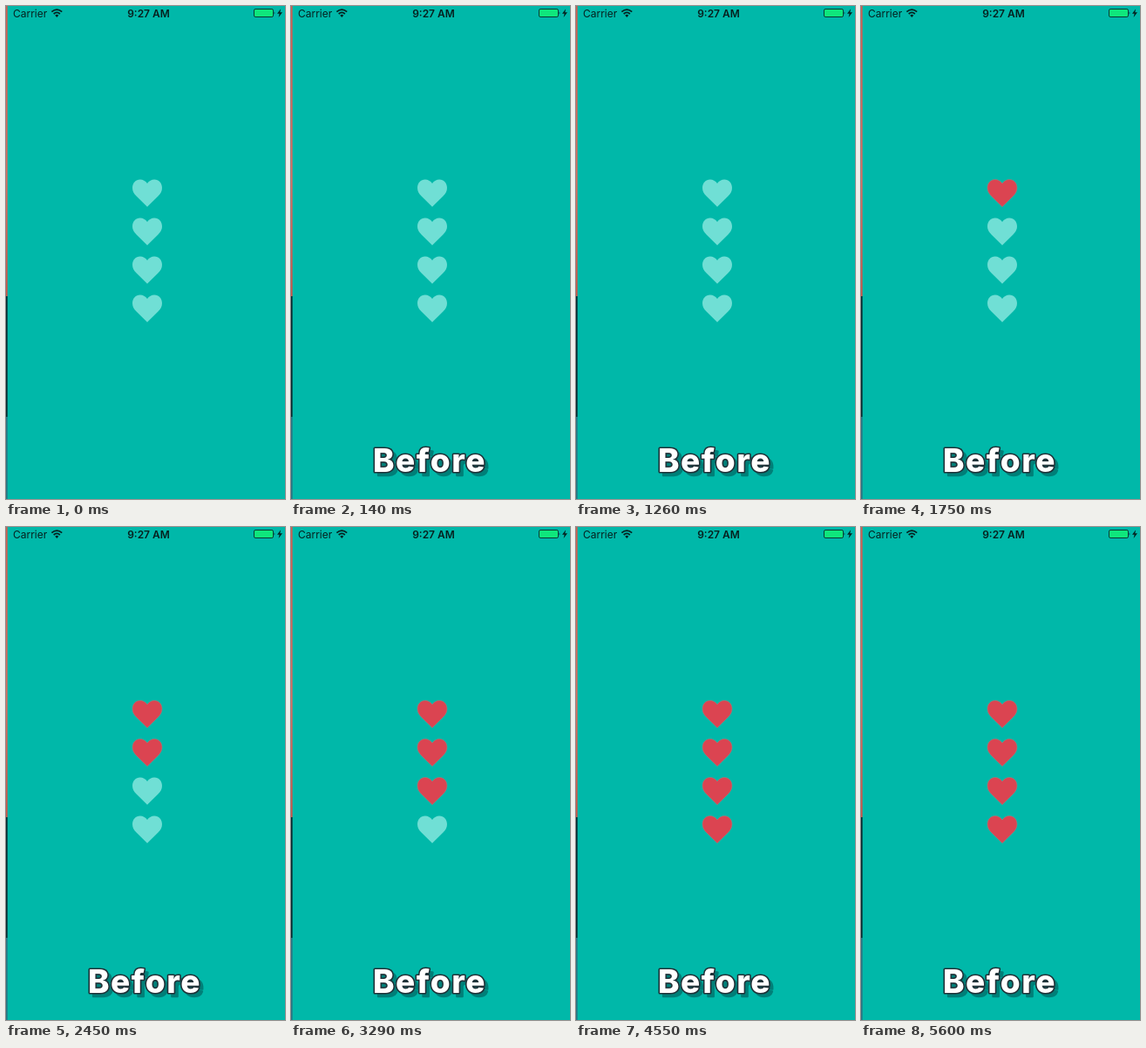
Recreate the animation shown at these times as an HTML page. Size 320 px wide and 564 px high, loop 5670 ms.

```html
<!DOCTYPE html>
<html lang="en">
<head>
<meta charset="utf-8">
<title>Hearts</title>
<style>
  html, body { margin: 0; width: 100%; height: 100%; overflow: hidden; background: #00b8a9; }
  svg { display: block; width: 320px; height: 564px; }
  text { font-family: Inter, Roboto, sans-serif; }
  .status { font-size: 12px; fill: #06211f; }
  .caption { font-size: 37px; font-weight: 800; letter-spacing: 1.5px; text-anchor: middle; }
</style>
</head>
<body>
<svg viewBox="0 0 320 564">
  <defs>
    <linearGradient id="edgeRed" x1="0" y1="0" x2="0" y2="1">
      <stop offset="0" stop-color="#cf5d50"/>
      <stop offset=".6" stop-color="#d66f62"/>
      <stop offset="1" stop-color="#c95548"/>
    </linearGradient>
    <path id="heart" d="M0 31.2L-12.2 19.3C-15.4 16 -17 13.2 -17 9.4C-17 4 -13.2 0 -8.2 0C-5 0 -2 1.6 0 4.6C2 1.6 5 0 8.2 0C13.2 0 17 4 17 9.4C17 13.2 15.4 16 12.2 19.3Z"/>
  </defs>

  <rect width="320" height="564" fill="#00b8a9"/>

  <!-- sliver of the neighbouring screen -->
  <rect width="1.7" height="332" fill="url(#edgeRed)"/>
  <rect y="332" width="1.7" height="138" fill="#0a2b31"/>
  <rect y="470" width="1.7" height="94" fill="#2b7482"/>

  <text class="status" x="8" y="12.5">Carrier</text>
  <g fill="none" stroke="#06211f" stroke-width="1.7">
    <path d="M52.4 6.7Q58.3 1.4 64.2 6.7"/>
    <path d="M54.7 9Q58.3 5.7 61.9 9"/>
  </g>
  <path d="M58.3 13L56.3 10.7Q58.3 9 60.3 10.7Z" fill="#06211f"/>
  <text class="status" x="163.5" y="12.5" font-weight="600" text-anchor="middle">9:27 AM</text>
  <rect x="284.5" y="3.5" width="22" height="9" rx="1.6" fill="#0fe67c" stroke="#0a3a36"/>
  <path d="M307.6 6.2Q309.2 8 307.6 9.8Z" fill="#06211f"/>
  <path d="M315.2 3.2L311 8.8H313.6L312.6 13L317 7.2H314.3Z" fill="#06211f"/>

  <g id="hearts"></g>

  <g id="caption" class="caption">
    <text x="163" y="536.5" fill="#007f78" stroke="#007f78" stroke-width="2.4" stroke-linejoin="round">Before</text>
    <text x="159" y="533" fill="#fff" stroke="#203238" stroke-width="3.2" stroke-linejoin="round" paint-order="stroke">Before</text>
  </g>
</svg>
<script>
  const LOOP = 5670;
  const CAPTION_AT = 70;
  const TAPS = [1680, 2310, 2940, 3640];
  const SVG = 'http://www.w3.org/2000/svg';
  const caption = document.getElementById('caption');
  const group = document.getElementById('hearts');

  const hearts = TAPS.map((_, i) => {
    const heart = document.createElementNS(SVG, 'use');
    heart.setAttribute('href', '#heart');
    heart.setAttribute('transform', `translate(162 ${198.5 + 44 * i})`);
    heart.setAttribute('stroke-width', '.6');
    return group.appendChild(heart);
  });

  function draw(t) {
    caption.setAttribute('visibility', t >= CAPTION_AT ? 'visible' : 'hidden');
    hearts.forEach((heart, i) => {
      const liked = t >= TAPS[i];
      heart.setAttribute('fill', liked ? '#db4451' : '#70dfd5');
      heart.setAttribute('stroke', liked ? '#a2807f' : 'none');
    });
  }

  const start = performance.now();
  function tick() {
    draw((performance.now() - start) % LOOP);
    requestAnimationFrame(tick);
  }
  tick();
</script>
</body>
</html>
```
